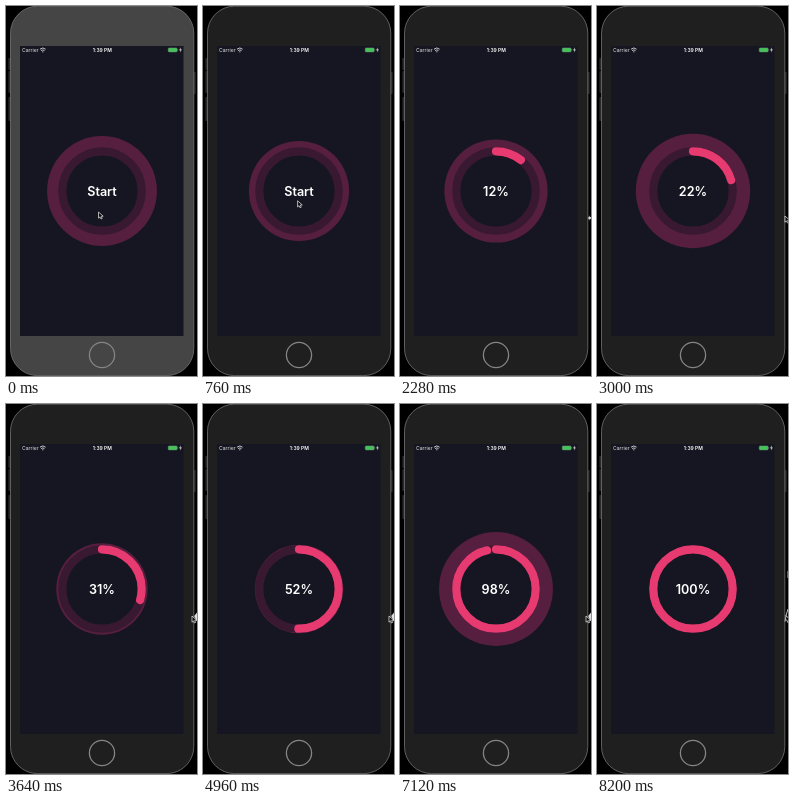
Write an HTML page that moves like this. It is 191 by 370 pixels and loops after 8.24 s.

```html
<!DOCTYPE html>
<html lang="en">
<head>
<meta charset="utf-8">
<title>Progress ring</title>
<style>
  html, body { margin: 0; width: 100%; height: 100%; overflow: hidden; background: #000; }
  svg { display: block; width: 191px; height: 370px; }
  text { font-family: Inter, "Liberation Sans", sans-serif; fill: #fff; }
  .mid { text-anchor: middle; }
  #body { animation: focus 8240ms step-end infinite; }
  @keyframes focus { 0% { fill: #454546; } 6.8% { fill: #1f1f20; } }
</style>
</head>
<body>
<svg viewBox="0 0 191 370">
  <rect width="191" height="370" fill="#000"/>
  <g fill="#29292a">
    <rect x="2.4" y="52" width="2" height="12" rx=".7"/>
    <rect x="2.4" y="65" width="2" height="22" rx=".7"/>
    <rect x="2.4" y="91" width="2" height="24" rx=".7"/>
    <rect x="187.6" y="66" width="2" height="22" rx=".7"/>
  </g>
  <rect id="body" x="4.5" y=".2" width="183.3" height="369.4" rx="27" fill="#454546" stroke="#747476" stroke-width=".8"/>
  <rect x="14" y="40" width="163.5" height="290" fill="#151621"/>
  <circle cx="96" cy="349" r="12.6" fill="none" stroke="#858587" stroke-width="1.3"/>

  <text x="16" y="46" font-size="5.1" fill-opacity=".9">Carrier</text>
  <g fill="none" stroke="#ddd" stroke-width=".9">
    <path d="M34 43.2q2.8-2.5 5.6 0M35.1 44.6q1.7-1.4 3.4 0"/>
    <path d="M36.2 45.8h1.2"/>
  </g>
  <text class="mid" x="96.3" y="46" font-size="5" font-weight="600">1:39 PM</text>
  <rect x="162.2" y="41.9" width="9" height="4" rx="1" fill="#45c35b" stroke="#6b8f73" stroke-width=".5"/>
  <path d="M171.8 43.2v1.4" stroke="#777" stroke-width=".6"/>
  <path d="M174.9 41.2l-1.8 3h1.3l-.5 2.3 2-3.1h-1.4z" fill="#ddd"/>

  <circle id="pulse" cx="96" cy="185" r="55" fill="#561e3f"/>
  <circle cx="96" cy="185" r="39.7" fill="#151621" stroke="#381931" stroke-width="8.2"/>
  <circle id="arc" cx="96" cy="185" r="39.7" fill="none" stroke="#e73a70" stroke-width="8.2"
          stroke-linecap="round" pathLength="100" transform="rotate(-90 96 185)"/>
  <text id="label" class="mid" x="96" y="189.6" font-size="12.6" font-weight="600">Start</text>

  <g id="arrow">
    <path d="M0 0v6.2l1.5-1.3 1 2.1 1.2-.6-1-2 2-.2z" fill="#111" stroke="#eee" stroke-width=".7"/>
  </g>
  <path id="edge" d="M188 212l1.7-2.4v1.5H191v1.8h-1.3v1.5z" fill="#eee" stroke="#555" stroke-width=".3"/>
  <path id="flag" d="M188.2 212l2.8-3.5v9l-1.2-2z" fill="#ddd"/>
  <path id="hand" d="M188 217.5l1.2-6.5 1.8-6M188.5 211.5l2.5 2M189.4 215.5l1.6 3.3" fill="none" stroke="#d8d8d8" stroke-width=".9"/>
  <path id="sliver" d="M190.6 167v7" stroke="#999" stroke-width=".7"/>
</svg>
<script>
  const LOOP = 8240, LOW = 43.2, HIGH = 59;
  const $ = id => document.getElementById(id);
  const [pulse, arc, label, arrow, edge, flag, hand, sliver] =
    ['pulse', 'arc', 'label', 'arrow', 'edge', 'flag', 'hand', 'sliver'].map($);

  // Each beat grows and shrinks between two times
  const beats = [[-850, 330], [550, 1990], [1990, 3570], [3570, 4990], [4990, 6550], [6550, 8180]];
  const progress = [[900, 0], [1300, 1], [2280, 12], [3640, 31], [4960, 52], [6160, 80], [7200, 100]];
  const pointer = [[560, 92.5, 206], [900, 96, 187], [1440, 96, 187], [2160, 188, 210], [3000, 188, 210], [3120, 186, 212]];

  // cubic-bezier(0, 0, .58, 1)
  function easeOut(x) {
    let a = 0, b = 1;
    for (let i = 0; i < 20; i++) {
      const u = (a + b) / 2;
      if (1.74 * u * u * (1 - u) + u ** 3 < x) a = u; else b = u;
    }
    return 3 * a * a * (1 - a) + a ** 3;
  }

  function track(keys, t, col = 1) {
    if (t <= keys[0][0]) return keys[0][col];
    const i = keys.findIndex(k => k[0] > t);
    if (i < 0) return keys[keys.length - 1][col];
    const p = keys[i - 1], q = keys[i];
    return p[col] + (q[col] - p[col]) * (t - p[0]) / (q[0] - p[0]);
  }

  function radius(t) {
    const beat = beats.find(([a, b]) => t >= a && t < b);
    if (!beat) return LOW;
    const [a, b] = beat;
    return LOW + (HIGH - LOW) * easeOut(1 - Math.abs(2 * (t - a) / (b - a) - 1));
  }

  const show = (el, on) => el.style.visibility = on ? 'visible' : 'hidden';

  function draw(t) {
    pulse.setAttribute('r', radius(t));

    const part = track(progress, t - 110);
    show(arc, t >= 900);
    arc.setAttribute('stroke-dasharray', part >= 100 ? 'none' : Math.max(part, .05) + ' 200');
    label.textContent = t < 900 ? 'Start' : Math.floor(track(progress, t) + .3) + '%';

    arrow.setAttribute('transform', `translate(${track(pointer, t)} ${track(pointer, t, 2)})`);
    const atEdge = t >= 2160 && t < 3000, leaving = t >= 7800;
    show(arrow, !atEdge && !leaving);
    show(edge, atEdge);
    show(flag, t >= 3120 && !leaving);
    show(hand, leaving);
    show(sliver, t >= 8200);
  }

  const body = $('body').getAnimations()[0];
  const start = performance.now();
  function frame() {
    const t = (performance.now() - start) % LOOP;
    if (body) body.currentTime = t;
    draw(t);
    requestAnimationFrame(frame);
  }
  frame();
</script>
</body>
</html>
```
